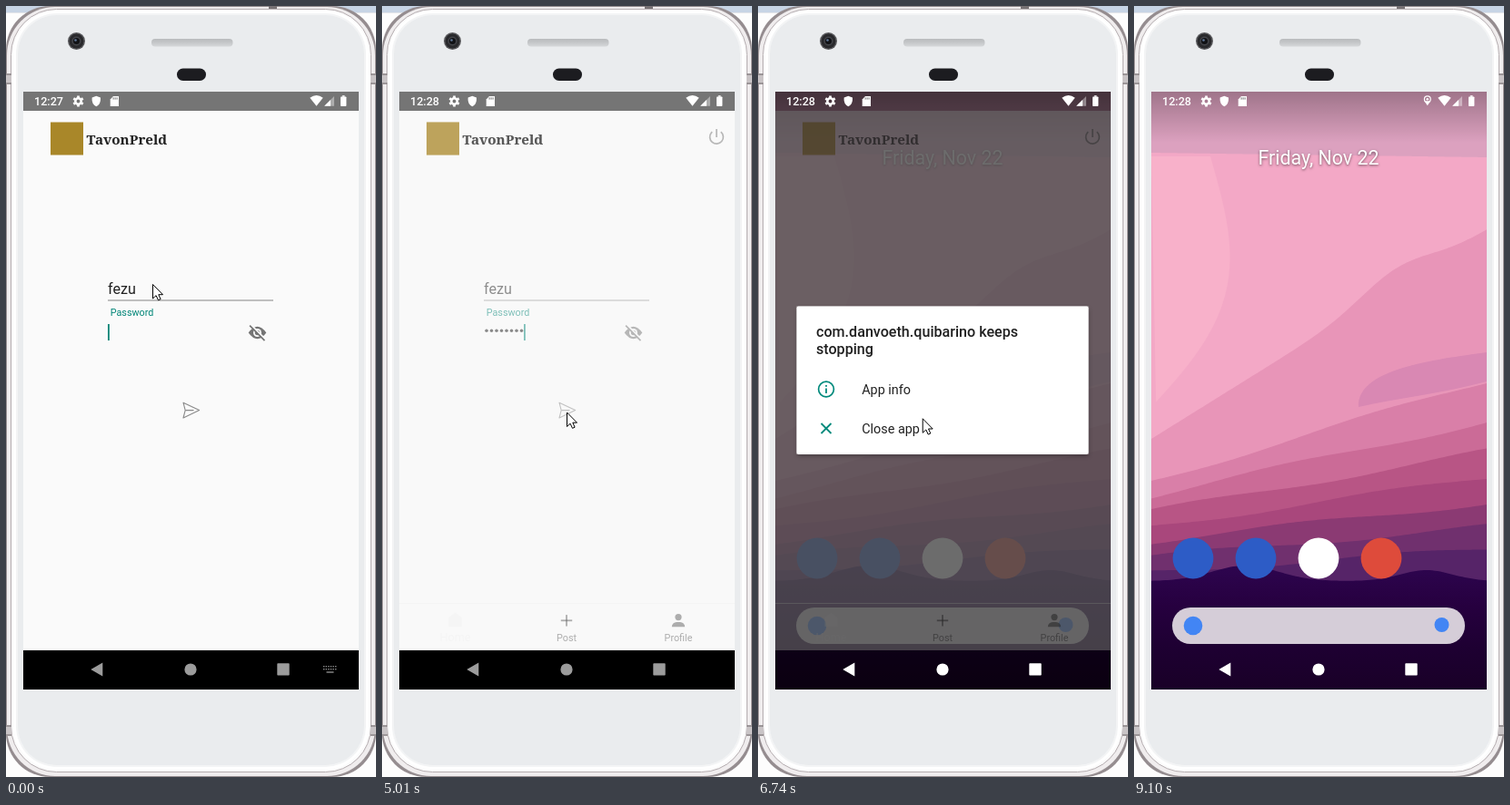
Write an HTML page with a canvas that moves like this. It is 407 px wide and 846 px high and loops after 9.37 s.

```html
<!DOCTYPE html>
<html lang="en">
<head>
<meta charset="utf-8">
<title>Phone demo</title>
<style>
html, body { margin: 0; width: 100%; height: 100%; overflow: hidden; background: #fdfdfd; }
canvas { display: block; width: 407px; height: 846px; }
</style>
</head>
<body>
<canvas id="stage"></canvas>
<script>
const W = 407, H = 846, LOOP = 9370;
const LEFT = 19, TOP = 94, WIDE = 369, TALL = 656;
const canvas = document.getElementById('stage');
const dpr = window.devicePixelRatio || 1;
canvas.width = W * dpr;
canvas.height = H * dpr;
const c = canvas.getContext('2d');

const TEAL = '#008577', GREY = '#757575', PAGE = '#fafafa', TAB = '#616161';
const SECRET = 'password';
const KEY_TIMES = [150, 290, 430, 730, 1160, 1310, 1590, 1870];

// Progress from 0 to 1 in n hard steps, the first at a and the last at b
function ramp(t, a, b, n) {
  const step = Math.floor((t - a + 10) * (n - 1) / (b - a)) + 1;
  return Math.min(1, Math.max(0, step / n));
}

const bump = (x, mid, width) => Math.exp(-(((x - mid) / width) ** 2));

function rect(color, x, y, w, h) {
  c.fillStyle = color;
  c.fillRect(x, y, w, h);
}

function round(x, y, w, h, r, fill, stroke) {
  c.beginPath();
  c.roundRect(x, y, w, h, r);
  if (fill) { c.fillStyle = fill; c.fill(); }
  if (stroke) { c.strokeStyle = stroke; c.lineWidth = 1; c.stroke(); }
}

function disc(color, x, y, r) {
  c.fillStyle = color;
  c.beginPath();
  c.arc(x, y, r, 0, 7);
  c.fill();
}

function ring(color, lw, x, y, r, from = 0, to = 7) {
  c.strokeStyle = color;
  c.lineWidth = lw;
  c.beginPath();
  c.arc(x, y, r, from, to);
  c.stroke();
}

function poly(color, ...p) {
  c.beginPath();
  for (let i = 0; i < p.length; i += 2) c.lineTo(p[i], p[i + 1]);
  c.closePath();
  c.fillStyle = color;
  c.fill();
}

function line(color, lw, x, y, x2, y2) {
  c.strokeStyle = color;
  c.lineWidth = lw;
  c.beginPath();
  c.moveTo(x, y);
  c.lineTo(x2, y2);
  c.stroke();
}

function text(s, x, y, size, color, weight = 400, align = 'left', family = 'Roboto, sans-serif') {
  c.font = `${weight} ${size}px ${family}`;
  c.textAlign = align;
  c.fillStyle = color;
  c.fillText(s, x, y);
}

function fade(y, y2, ...stops) {
  const g = c.createLinearGradient(0, y, 0, y2);
  stops.forEach((s, i) => g.addColorStop(i / (stops.length - 1), s));
  return g;
}

function shadow(color, blur, dy) {
  c.shadowColor = color;
  c.shadowBlur = blur * dpr;
  c.shadowOffsetY = dy * dpr;
}

function phone() {
  rect('#fdfdfd', 0, 0, W, H);
  rect('#c7d4e5', 0, 0, W, 7);
  rect('#e4e6e9', 0, 7, W, 1);
  // The tighter outer radius leaves dark crescents at the corners
  round(0, 0, 407, 846, 48, '#958d90');
  round(1, 1, 405, 844, 53, '#f0edee');
  round(5.5, 3.5, 396, 837, 50, '#fbfbfb', '#b4acaf');
  round(8, 5, 391, 833, 48, '#ffffff');
  round(11, 8, 385, 827, 45, '#f3f4f5');
  round(13, 10, 381, 823, 43, '#eaecee');
  for (const x of [0, 401]) {
    for (const y of [74, 789]) {
      rect('#9b9597', x, y, 6, 12);
      rect('#c9c4c6', x, y + 2, 6, 8);
    }
  }
  rect('#777174', 289, 0, 9, 3);

  disc('#58585b', 77.5, 38.5, 9.5);
  disc('#29292c', 77.5, 38.5, 8);
  disc('#45464b', 77.5, 38.5, 5);
  disc('#111215', 77.5, 38.5, 3.6);
  disc('#62799a', 76.5, 37.5, 1.3);
  round(160, 36, 89.5, 8.5, 4, fade(36, 44, '#b9bbbd', '#c4c6c8', '#d4d6d8'));
  round(188, 68.5, 32, 13.5, 6.7, '#1c1c20');
}

function page() {
  rect(PAGE, LEFT, 115, WIDE, 592);
  rect('#a98729', 49, 127.5, 36, 36);
  text('TavonPreld', 88.5, 151.5, 15.2, '#222', 700, 'left', '"Noto Serif", serif');
}

function hiddenEye(x, y) {
  c.fillStyle = GREY;
  c.beginPath();
  c.moveTo(x - 9.8, y);
  c.quadraticCurveTo(x, y - 13.5, x + 9.8, y);
  c.quadraticCurveTo(x, y + 13.5, x - 9.8, y);
  c.fill();
  disc(PAGE, x, y, 4.5);
  disc(GREY, x, y, 2.7);
  line(PAGE, 2, x - 7, y - 8.6, x + 9.6, y + 8);
  line(GREY, 1.7, x - 8.4, y - 7.8, x + 8, y + 8.6);
}

function sendIcon(x, y) {
  const color = '#8a8a8a';
  c.lineJoin = 'round';
  c.beginPath();
  c.moveTo(x, y - 8.4);
  c.lineTo(x + 17.6, y);
  c.lineTo(x, y + 8.4);
  c.lineTo(x + 2.2, y);
  c.closePath();
  c.strokeStyle = color;
  c.lineWidth = 1.1;
  c.stroke();
  line(color, 1.3, x + 2.2, y, x + 11.5, y);
}

function login(t) {
  page();
  text('fezu', 112, 316, 16.1, '#212121');
  rect('#858585', 112, 322.5, 182, 1);
  text('Password', 114.7, 340, 10.8, TEAL);

  const typed = KEY_TIMES.filter(k => k <= t).length;
  const peek = typed > 0 && t < 2300;
  const dots = peek ? typed - 1 : typed;
  for (let i = 0; i < dots; i++) disc('#1b1b1b', 115 + i * 5.5, 356.3, 1.75);
  let caret = 112 + dots * 5.5;
  if (peek) {
    text(SECRET[dots], caret, 363, 16.1, '#212121');
    caret += 9;
  }
  const blinking = t >= 2300 && t < 3870;
  if (!blinking || (t - 2300) % 1000 >= 500) rect(TEAL, caret, 349, 1.8, 18);
  hiddenEye(276.5, 358.5);
  sendIcon(195, 443.6);
}

function feed() {
  page();
  ring(GREY, 1.7, 368, 143.7, 7.4, -0.87, Math.PI + 0.87);
  line(GREY, 1.7, 368, 135, 368, 144);

  rect('#efefef', LEFT, 655, WIDE, 1);
  poly('#f2f2f2', 80.5, 665.5, 87.5, 671, 87.5, 681, 73.5, 681, 73.5, 671);
  text('Home', 80.5, 697, 12.6, '#f2f2f2', 400, 'center');
  rect(TAB, 196.8, 673.4, 12.4, 1.8);
  rect(TAB, 202.1, 668.1, 1.8, 12.4);
  text('Post', 203, 697.3, 10.8, TAB, 400, 'center');
  disc(TAB, 326, 670.6, 3.6);
  round(318.8, 676, 14.4, 5.3, [7, 7, 0, 0], TAB);
  text('Profile', 326, 697.3, 10.8, TAB, 400, 'center');
}

// Fills everything below height(u), with u from 0 to 1 across the screen
function ridge(color, height) {
  c.fillStyle = color;
  c.beginPath();
  for (let x = 0; x <= WIDE; x += 3) c.lineTo(LEFT + x, height(x / WIDE));
  c.lineTo(LEFT + WIDE, TOP + TALL);
  c.lineTo(LEFT, TOP + TALL);
  c.fill();
}

function wallpaper() {
  rect('#dca1bf', LEFT, TOP, WIDE, TALL);
  ridge('#f3a8c6', u => 161 + 5 * u);

  c.fillStyle = '#f8b1ca';
  c.beginPath();
  c.moveTo(LEFT, 165);
  for (let s = 0; s <= 1; s += 0.02) {
    c.lineTo(LEFT + (65 + 25 * Math.sin(Math.PI * s)) * (1 - s ** 4), 165 + 275 * s);
  }
  c.fill();

  ridge('#e895b8', u => 475 - 229 * u - 20 * bump(u, 0.73, 0.15));

  const layers = ['#d97fa8', '#cb6b97', '#b85585', '#a9477c', '#8b3a73', '#70306e', '#562468'];
  layers.forEach((color, i) => {
    const k = i / (layers.length - 1);
    const left = 521 + 100 * k, right = 412 + 184 * k ** 0.8;
    ridge(color, u => left + (right - left) * u + 3 * Math.sin(7 * u + 2 * i));
    if (i === 0) lavender();
  });

  ridge(fade(612, 750, '#2e0550', '#26003f', '#1e0032', '#190027'),
    u => 631 - 17 * bump(u, 0.28, 0.14) - 12 * bump(u, 0.82, 0.11));
}

function lavender() {
  c.fillStyle = '#d988b3';
  c.beginPath();
  c.moveTo(388, 380);
  c.bezierCurveTo(330, 388, 245, 398, 247, 440);
  c.bezierCurveTo(290, 430, 340, 425, 388, 412);
  c.fill();
}

function launcher() {
  wallpaper();
  rect(fade(TOP, 150, 'rgba(0,0,0,.28)', 'rgba(0,0,0,0)'), LEFT, TOP, WIDE, 56);
  c.save();
  shadow('rgba(0,0,0,.55)', 3, 1);
  text('Friday, Nov 22', 203, 174.3, 21.4, '#fff', 400, 'center');
  c.restore();
  ['#2d5cc6', '#2d5cc6', '#ffffff', '#de4b3b'].forEach((color, i) => disc(color, 65 + i * 69, 606, 22.4));
  round(42, 660, 322, 40, 20, '#d5cdd8');
  disc('#4285f4', 65, 680, 10.3);
  disc('#4285f4', 338.5, 679, 8);
}

function locationPin(x, y) {
  ring('#fff', 1.2, x, y, 3.4);
  disc('#fff', x, y, 1.3);
  poly('#fff', x - 3.4, y + 2, x + 3.4, y + 2, x, y + 7);
}

function statusIcons(t) {
  const white = '#fff';
  text(t < 4740 ? '12:27' : '12:28', 31, 109.3, 12.6, white, 500);

  ring(white, 2.5, 79.5, 104.5, 3.2);
  for (let i = 0; i < 6; i++) {
    const a = Math.PI * (i / 3 + 1 / 6), x = Math.cos(a), y = Math.sin(a);
    line(white, 2.7, 79.5 + x * 4, 104.5 + y * 4, 79.5 + x * 6, 104.5 + y * 6);
  }

  c.beginPath();
  c.moveTo(99.3, 98.7);
  c.lineTo(104, 100.6);
  c.quadraticCurveTo(104.5, 108, 99.3, 110.2);
  c.quadraticCurveTo(94, 108, 94.6, 100.6);
  c.fillStyle = white;
  c.fill();

  poly(white, 118, 99, 124, 99, 124, 110, 114.7, 110, 114.7, 102.4);
  for (let i = 0; i < 3; i++) rect(GREY, 117.6 + i * 2, 100.3, 1, 2.3);

  c.beginPath();
  c.moveTo(341.5, 109.7);
  c.lineTo(334.3, 100.8);
  c.quadraticCurveTo(341.5, 95.4, 348.7, 100.8);
  c.fillStyle = white;
  c.fill();
  poly('rgba(255,255,255,.4)', 361, 99, 361, 109.8, 350.2, 109.8);
  poly(white, 357, 103, 357, 109.8, 350.2, 109.8);
  round(368, 99.4, 6.4, 10.6, 0.8, white);
  rect(white, 369.8, 98.2, 2.8, 1.5);
  if (t >= 7570) locationPin(322.8, 102.3);
}

function navIcons(color, keyboard) {
  poly(color, 93.3, 728, 106.3, 720.5, 106.3, 735.5);
  disc(color, 203, 728, 6.6);
  round(298.3, 721.2, 13.4, 13.4, 0.8, color);
  if (!keyboard) return;
  for (let i = 0; i < 12; i++) rect('#8c8c8c', 349 + (i % 6) * 2.6, i < 6 ? 724 : 727, 1.4, 1.4);
  rect('#8c8c8c', 352.5, 730.3, 8, 1.4);
}

// Shadows stay outside the panel so that it can be translucent
function dialogShadow(alpha, halo) {
  c.save();
  c.beginPath();
  c.rect(0, 0, W, H);
  c.rect(42.5, 329.5, 321, 162.5);
  c.clip('evenodd');
  if (halo) {
    const s = 11 - 6 * alpha;
    round(42 - s, 337 - s, 322 + 2 * s, 163 + 2 * s, 10, `rgba(0,0,0,${0.07 * alpha})`);
  }
  c.globalAlpha = alpha;
  shadow('rgba(0,0,0,.35)', 5, 2);
  rect('#fff', 42.5, 329.5, 321, 162.5);
  c.restore();
}

function dialog(alpha, ink, halo) {
  if (ink <= 0) return;
  const icon = '#008a7c', dark = '#212121';
  dialogShadow(alpha, halo);
  c.save();
  c.globalAlpha = alpha;
  round(42.5, 329.5, 321, 162.5, 2, '#fff');
  c.globalAlpha = ink;
  text('com.danvoeth.quibarino keeps', 64, 363, 16.1, dark, 500);
  text('stopping', 64, 381.7, 16.1, dark, 500);
  ring(icon, 1.7, 75, 420.5, 8.4);
  rect(icon, 74.1, 416, 1.8, 1.8);
  rect(icon, 74.1, 419.5, 1.8, 5.5);
  line(icon, 1.8, 69.5, 458, 80.5, 469);
  line(icon, 1.8, 80.5, 458, 69.5, 469);
  text('App info', 114.2, 426, 14.4, dark);
  text('Close app', 114.2, 469, 14.4, dark);
  c.restore();
}

function pointer(t) {
  const toSend = ramp(t, 2300, 3290, 8), rest = ramp(t, 4740, 5440, 6);
  const toClose = ramp(t, 6460, 7290, 7), away = ramp(t, 8520, 9100, 5);
  const arc = Math.sin(Math.PI * toSend);
  const x = 161 + 45 * toSend + 51 * arc - 6 * rest - 45 * toClose;
  const y = 305 + 144 * (1 - (1 - toSend) ** 2) + 25 * arc - 7 * rest + 24 * toClose + 390 * away;
  c.save();
  c.translate(x + 0.5, y + 0.5);
  c.lineJoin = 'miter';
  poly('#fff', 0, 0, 0, 15.5, 3.6, 12.2, 6, 17.3, 8.6, 16.2, 6.3, 11.2, 11, 11.2);
  c.strokeStyle = '#000';
  c.lineWidth = 1;
  c.stroke();
  c.restore();
}

function blend(draw, alpha) {
  c.save();
  c.globalAlpha = alpha;
  draw();
  c.restore();
}

function render(now) {
  const t = now % LOOP;
  const enter = ramp(t, 4740, 5440, 6), leave = ramp(t, 6600, 7160, 5);
  const show = ramp(t, 5720, 6000, 3), hide = ramp(t, 8220, 8660, 4);
  const home = leave > 0;

  c.setTransform(dpr, 0, 0, dpr, 0, 0);
  phone();
  c.save();
  c.beginPath();
  c.rect(LEFT, TOP, WIDE, TALL);
  c.clip();

  if (home) {
    launcher();
    blend(feed, 1 - leave);
  } else {
    rect(GREY, LEFT, TOP, WIDE, 21);
    rect('#000', LEFT, 707, WIDE, 43);
    if (enter < 1) login(t);
    blend(feed, enter);
  }

  const depth = 0.21 * Math.max(0, 3 * show - 1) + (t >= 6460 ? 0.15 : 0);
  rect(`rgba(0,0,0,${depth * (1 - hide ** 1.4)})`, LEFT, TOP, WIDE, TALL);
  dialog(show * (1 - hide) ** 3, show * (1 - hide) ** 1.7, !home);
  statusIcons(t);
  navIcons(home ? '#fff' : '#9c9c9c', t < 4740);
  c.restore();
  pointer(t);
}

let start;
function loop(now) {
  start ??= now;
  render(now - start);
  requestAnimationFrame(loop);
}
render(0);
requestAnimationFrame(loop);
</script>
</body>
</html>
```
